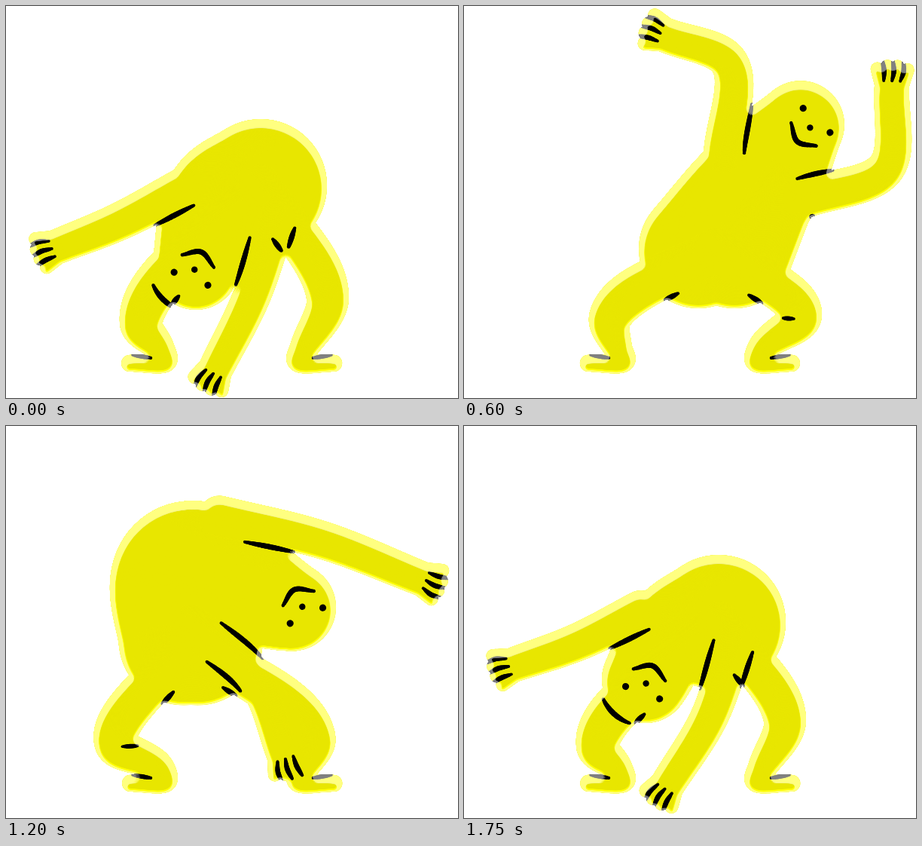
An HTML page with a canvas that plays this animation: 600 by 520 pixels, repeating every 1800 ms.

```html
<!DOCTYPE html>
<html lang="en">
<head>
<meta charset="utf-8">
<title>Swinging dancer</title>
<style>
  html, body { margin: 0; width: 100%; height: 100%; overflow: hidden; background: #fff; }
  canvas { display: block; }
</style>
</head>
<body>
<canvas id="stage" width="600" height="520"></canvas>
<script>
const W = 600, H = 520, LOOP = 1800, STEP = 50, TAU = Math.PI * 2;
const HEAD = 58;

// Joints of one pose. size: rump radius, rump half spread, chest radius.
// Arms run shoulder, elbow, palm.
const pose = (tilt, head, rump, chest, size, armA, armB, kneeL, kneeR) =>
  ({ tilt: [tilt], head, rump, chest, size, armA, armB, kneeL, kneeR });

const crouch = pose(-159, [252, 345], [338, 238], [285, 258], [88, 0, 74],
  [358, 285, 326, 385, 278, 482], [238, 240, 150, 286, 66, 320], [179, 420], [427, 387]);
const reachLeft = pose(-113, [251, 172], [352, 322], [392, 195], [86, 8, 100],
  [335, 245, 235, 283, 187, 374], [385, 100, 255, 78, 108, 117], [182, 418], [477, 428]);
const leanRight = pose(42, [447, 157], [335, 322], [382, 248], [79, 24, 84],
  [345, 195, 352, 75, 266, 38], [450, 255, 560, 215, 568, 106], [194, 413], [447, 410]);
const stoop = pose(160, [362, 337], [267, 214], [318, 240], [89, 0, 82],
  [360, 235, 448, 273, 533, 314], [240, 270, 288, 375, 310, 478], [183, 400], [412, 420]);
const reachRight = pose(51, [291, 126], [268, 330], [208, 215], [87, 0, 98],
  [158, 145, 245, 40, 384, 54], [290, 215, 390, 217, 440, 302], [115, 430], [431, 428]);
const leanLeft = pose(-64, [156, 197], [281, 316], [262, 255], [78, 29, 71],
  [195, 295, 85, 270, 32, 198], [225, 195, 205, 88, 262, 42], [163, 415], [417, 410]);
const lowest = pose(-160, [241, 336], [338, 260], [278, 275], [89, 0, 66],
  [358, 290, 326, 385, 270, 476], [235, 245, 150, 287, 65, 317], [177, 424], [426, 390]);

const flip = a => a.map((v, i) => i % 2 ? v : W - v);
const mirror = p => pose(-p.tilt[0], flip(p.head), flip(p.rump), flip(p.chest), p.size,
  flip(p.armB), flip(p.armA), flip(p.kneeR), flip(p.kneeL));

// Each pose returns mirrored half a loop later.
const half = [
  [0, crouch], [100, mirror(stoop)], [400, reachLeft], [450, mirror(reachRight)],
  [600, leanRight], [650, mirror(leanLeft)], [850, mirror(lowest)]
];
const keys = [-1, 0, 1, 2].flatMap(n =>
  half.map(([t, p]) => [t + n * LOOP / 2, n % 2 ? mirror(p) : p]));
const times = keys.map(k => k[0]);

// Hermite curve through the vectors ps at the positions ts.
function spline(ts, ps, t) {
  let i = 0;
  while (i < ts.length - 2 && t >= ts[i + 1]) i++;
  const h = ts[i + 1] - ts[i], u = (t - ts[i]) / h;
  return ps[i].map((v, c) => {
    const secant = j => (ps[j + 1][c] - ps[j][c]) / (ts[j + 1] - ts[j]);
    const s = secant(i);
    const m0 = i ? (secant(i - 1) + s) / 2 : s;
    const m1 = i < ts.length - 2 ? (s + secant(i + 1)) / 2 : s;
    const w = u * u * (3 - 2 * u);
    return v + (ps[i + 1][c] - v) * w + h * u * (1 - u) * (m0 * (1 - u) - m1 * u);
  });
}

function poseAt(t) {
  const p = {};
  for (const k in crouch) p[k] = spline(times, keys.map(q => q[1][k]), t);
  return p;
}

// Closely spaced samples of a smooth line through x, y, radius points.
function trace(...ps) {
  const ts = [0], out = [];
  for (let i = 1; i < ps.length; i++)
    ts.push(ts[i - 1] + Math.hypot(ps[i][0] - ps[i - 1][0], ps[i][1] - ps[i - 1][1]) + 1);
  for (let s = 0; s <= ts[ts.length - 1]; s += 1.5) out.push(spline(ts, ps, s));
  return out;
}

function layer() {
  const c = document.createElement('canvas');
  c.width = W;
  c.height = H;
  return c.getContext('2d');
}
const main = document.getElementById('stage').getContext('2d');
const shape = layer(), outside = layer(), rim = layer();

function dot(g, x, y, r) {
  g.beginPath();
  g.arc(x, y, Math.max(r, 1), 0, TAU);
  g.fill();
}
const fillLimb = limb => limb.forEach(p => dot(shape, ...p));

// A brush line, thinner towards both ends.
function brush(line, width) {
  line.forEach(([x, y], i) =>
    dot(main, x, y, width / 2 * (0.6 + 0.4 * Math.sin(Math.PI * i / line.length))));
}

// One side of a limb: 1 or -1.
const edge = (limb, side) => limb.slice(1).map(([x, y, r], i) => {
  const dx = x - limb[i][0], dy = y - limb[i][1], k = side * r / Math.hypot(dx, dy);
  return [x - dy * k, y + dx * k];
});

// The stretch of a limb's edge that still lies over the torso.
function crease(limb, side, torso, length) {
  const line = edge(limb, side);
  let end = line.length;
  while (end && !torso.some(([x, y, r]) =>
    Math.hypot(x - line[end - 1][0], y - line[end - 1][1]) < r)) end--;
  brush(line.slice(Math.max(0, end - length / 1.5), end + 2), 7);
}

function build(p) {
  const [rumpR, spread, chestR] = p.size;
  const arm = ([sx, sy, ex, ey, hx, hy]) => trace([sx, sy, 27], [ex, ey, 25], [hx, hy, 23]);
  const leg = (knee, side) => {
    const x = d => W / 2 + side * d;
    return trace([...p.rump, 28], [...knee, 28], [x(96), 453, 19], [x(88), 470, 15], [x(136), 474, 11]);
  };
  return {
    torso: [-1, 1].flatMap(side => trace(
      [p.rump[0] + side * spread, p.rump[1], rumpR], [...p.chest, chestR], [...p.head, HEAD])),
    arms: [arm(p.armA), arm(p.armB)],
    legs: [leg(p.kneeL, -1), leg(p.kneeR, 1)]
  };
}

// Maps points in a hand's own frame, fingers along x, to the stage.
function handFrame(arm) {
  const [x, y] = arm[arm.length - 1], [bx, by] = arm[arm.length - 8];
  const a = Math.atan2(y - by, x - bx), c = Math.cos(a), s = Math.sin(a);
  return (u, v) => [x + u * c - v * s, y + u * s + v * c];
}

function drawShape({ torso, arms, legs }) {
  shape.clearRect(0, 0, W, H);
  [torso, ...legs, ...arms].forEach(fillLimb);
  for (const arm of arms) {
    const at = handFrame(arm);
    for (const k of [-1.5, -0.5, 0.5, 1.5])
      fillLimb(trace([...at(0, 9 * k), 9], [...at(29 - 4 * Math.abs(k), 13.5 * k), 9]));
  }
}

// Covers the body within r of the outside, heavier on top by dy.
function drawRim(color, r, dy) {
  outside.globalCompositeOperation = 'source-over';
  outside.fillStyle = color;
  outside.fillRect(0, 0, W, H);
  outside.globalCompositeOperation = 'destination-out';
  outside.drawImage(shape.canvas, 0, 0);
  rim.globalCompositeOperation = 'source-over';
  rim.clearRect(0, 0, W, H);
  for (let a = 0; a < TAU; a += TAU / 20)
    rim.drawImage(outside.canvas, r * Math.cos(a), dy + r * Math.sin(a));
  rim.globalCompositeOperation = 'destination-in';
  rim.drawImage(shape.canvas, 0, 0);
  main.drawImage(rim.canvas, 0, 0);
}

// The face drifts from side to side on the head.
function drawFace(p, t) {
  main.save();
  main.translate(...p.head);
  main.rotate(p.tilt[0] * Math.PI / 180);
  main.translate(14 * Math.sin(TAU * t / LOOP), -5);
  dot(main, 0, 0, 4.2);
  dot(main, -24, -13, 4.6);
  dot(main, 24, -13, 4.6);
  brush(trace([-23, 12], [0, 25], [23, 12]), 7);
  main.restore();
}

// Where the crown overlaps a leg, an arc separates the two.
function drawCrown({ head: [x, y], tilt: [tilt] }) {
  const arc = [], up = (tilt - 90) * Math.PI / 180, lean = -Math.sign(tilt);
  for (let a = 0; a < 0.8; a += 0.02)
    arc.push([x + (HEAD + 4) * Math.cos(up + lean * a), y + (HEAD + 4) * Math.sin(up + lean * a)]);
  brush(arc, 7);
}

function drawLines(p, { torso, arms, legs }) {
  const under = p.tilt[0] < 0 ? 0 : 1;
  arms.forEach((arm, i) => {
    const side = i ? -1 : 1, at = handFrame(arm);
    crease(arm, side, torso, 65);
    if (i === under) crease(arm, -side, torso, 65);
    for (const k of [-1, 0, 1])
      brush(trace(at(7, 11 * k), at(20, 13 * k + 2), at(35, 14 * k)), 6.5);
  });
  legs.forEach((leg, i) => {
    const side = i ? 1 : -1, [x, y] = i ? p.kneeR : p.kneeL;
    crease(leg, side, torso, 16);
    const fold = 0.7 * (side * (x - W / 2) - 126);
    if (fold > 5) brush(trace([x - side * 9, y + 5], [x - side * (9 + fold), y + 4]), 6);
    brush(trace([W / 2 + side * 132, 463], [W / 2 + side * 107, 467]), 6);
  });
  drawCrown(p);
}

function draw(t) {
  const p = poseAt(t), body = build(p);
  shape.fillStyle = '#e8e600';
  drawShape(body);
  main.globalCompositeOperation = 'source-over';
  main.clearRect(0, 0, W, H);
  main.drawImage(shape.canvas, 0, 0);
  drawRim('#ff0', 7.5, 3.5);
  main.globalCompositeOperation = 'source-atop';
  main.fillStyle = '#000';
  drawLines(p, body);
  drawFace(p, t);
  main.globalAlpha = 0.5;
  drawRim('#fff', 7, 5);
  main.globalAlpha = 1;
}

let shown = -1;
function tick() {
  const t = Math.floor(performance.now() % LOOP / STEP) * STEP;
  if (t !== shown) draw(shown = t);
  requestAnimationFrame(tick);
}
tick();
</script>
</body>
</html>
```
